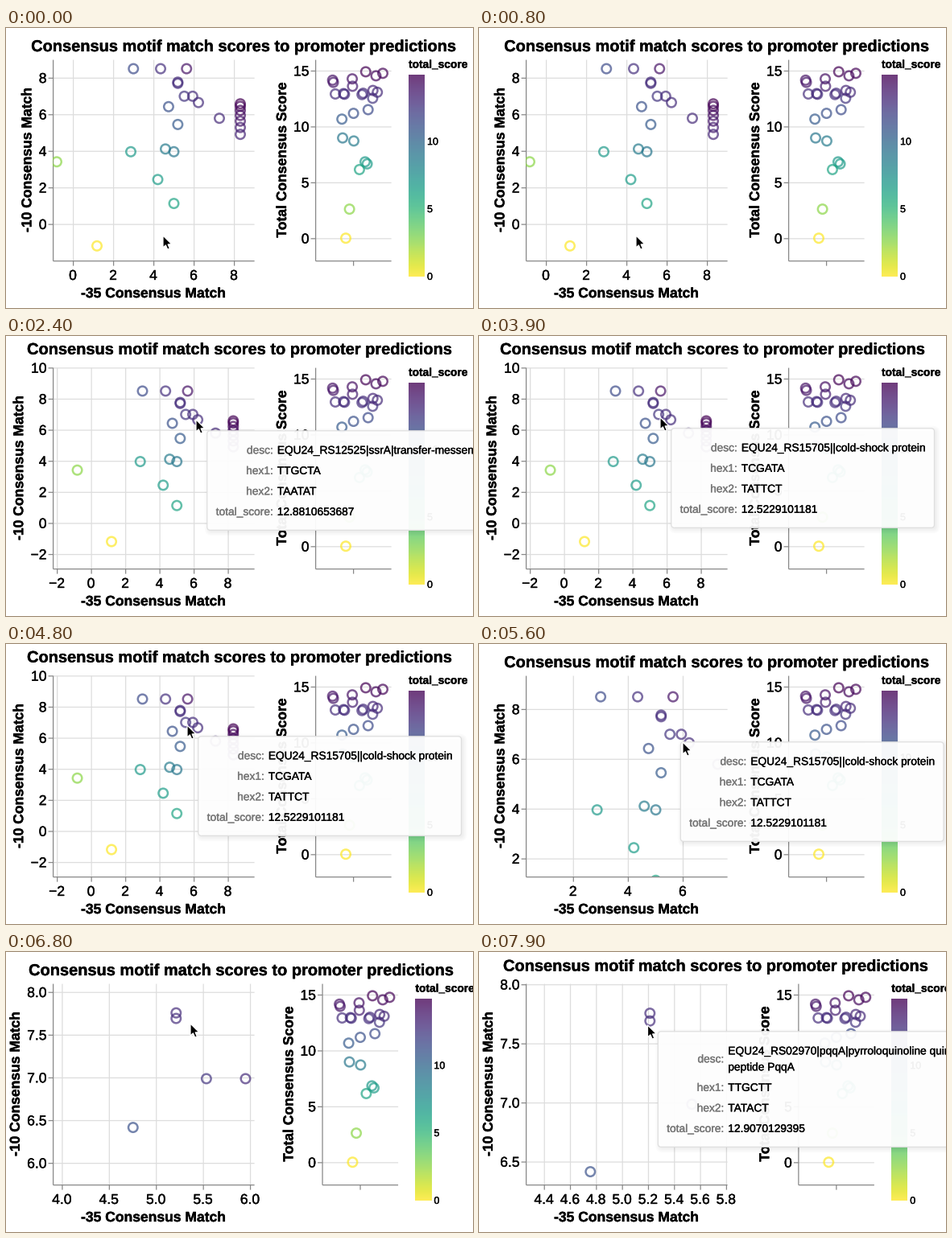
Recreate the animation shown at these times as a matplotlib script. Size 580 by 348 pixels, loop 8000 ms.

```python
import math

import matplotlib.pyplot as plt
import numpy as np
from matplotlib.animation import FuncAnimation
from matplotlib.patches import FancyBboxPatch, Polygon, Rectangle
from matplotlib.patheffects import withStroke

W, H, DPI = 580, 348, 100
PT = 72 / DPI  # points per pixel
STEP = 100     # ms per frame
plt.rcParams["font.family"] = "Liberation Sans"
plt.rcParams["text.hinting"] = "none"

LEFT, RIGHT, TOP, BOTTOM = 58, 308, 39, 289
AXIS, GRID = "#888888", "#dddddd"
MAX_SCORE = 14.9
VIRIDIS = plt.get_cmap("viridis")

# -35 and -10 match; the best -35 matches share one column
SPREAD = [
    (3.01, 8.49), (4.36, 8.49), (5.65, 8.49), (5.215, 7.755), (5.215, 7.69),
    (5.537, 6.985), (5.953, 6.985), (6.24, 6.64), (4.757, 6.414),
    (5.215, 5.44), (4.6, 4.1), (5.02, 3.95), (2.88, 3.95), (4.22, 2.43),
    (5.02, 1.12), (-0.8, 3.4), (1.2, -1.2), (7.28, 5.78),
]
COLUMN = [(8.32, 6.57 - 1.67 * (k / 6) ** 1.4) for k in range(7)]
POINTS = np.array(SPREAD + COLUMN)
SCORES = POINTS.sum(axis=1)
COLORS = VIRIDIS(1 - np.clip(SCORES / MAX_SCORE, 0, 1))

# Sideways jitter swings wider with the rank of the score
RANK = SCORES.argsort().argsort()
JITTER = 50 - (12 + RANK) * np.cos(2 * np.pi * RANK / 6.5)

# start, end, factor, fixed point
ZOOMS = [
    (1200, 2200, 1 / 1.177, (233, 169)),
    (4900, 5500, 1.603, (200, 73)),
    (5600, 6700, 3.431, (232.3, 93.6)),
    (6800, 7300, 1.383, (208.6, 74.5)),
]

# arrival time and place of the pointer tip
SPEED = 0.25  # px per ms
STOPS = [
    (0, (195, 258)), (1200, (230, 169)), (2400, (236, 104)),
    (3200, (225, 101)), (5500, (236.5, 108)), (5600, (253, 122)),
    (5900, (229, 89)), (7000, (208.5, 85)), (7900, (209.5, 91)),
]

# first and last time shown, then the four fields
KEYS = ("desc", "hex1", "hex2", "total_score")
TIPS = [
    (2300, 3100, "EQU24_RS12525|ssrA|transfer-messenger RNA",
     "TTGCTA", "TAATAT", "12.8810653687"),
    (3200, 5600, "EQU24_RS15705||cold-shock protein",
     "TCGATA", "TATTCT", "12.5229101181"),
    (7300, 7900, "EQU24_RS02970|pqqA|pyrroloquinoline quinone precursor\n"
     "peptide PqqA", "TTGCTT", "TATACT", "12.9070129395"),
]

fig = plt.figure(figsize=(W / DPI, H / DPI), dpi=DPI, facecolor="white")
ax = fig.add_axes([0, 0, 1, 1])


def line(x0, y0, x1, y1, color=AXIS):
    ax.plot([x0 + 0.6, x1 + 0.6], [y0 + 0.6, y1 + 0.6], color=color,
            lw=1.25 * PT, solid_capstyle="butt", snap=False,
            zorder=1 if color == GRID else 2)


def text(x, y, s, size, ha="left", bold=False, color="black", z=4, rot=0):
    ax.text(x, y, s, fontsize=size * PT, ha=ha, va="baseline", color=color,
            weight="bold" if bold else "normal", rotation=rot,
            rotation_mode="anchor", zorder=z,
            path_effects=[withStroke(linewidth=0.35 * PT, foreground=color)])


def circles(x, y):
    return ax.scatter(x, y, s=(11.5 * PT) ** 2, facecolors="none",
                      edgecolors=COLORS, linewidths=2.5 * PT, alpha=0.7,
                      zorder=3)


def zoom(t):
    """Scale and offset of the plot after all zooming up to time t."""
    scale, offset = 1, np.zeros(2)
    for start, end, factor, fixed in ZOOMS:
        f = np.clip((t - start) / (end - start), 0, 1)
        k = factor ** (1 - (1 - f) ** 2)
        scale *= k
        offset = fixed + (offset - fixed) * k
    return scale, offset


def pointer(t):
    """Rest at each stop, then leave just in time for the next one."""
    pos = np.array(STOPS[0][1], float)
    for arrive, stop in STOPS[1:]:
        way = np.subtract(stop, pos)
        left = max(arrive - t, 0) * SPEED / np.hypot(*way)
        pos = pos + way * (1 - min(left, 1))
        if left > 0:
            break
    return pos


def ticks(lo, hi):
    """Nice tick values and their labels, about five per axis."""
    raw = (hi - lo) / 5
    base = 10 ** math.floor(math.log10(raw))
    step = base * next(m for m in (10, 5, 2, 1)
                       if m == 1 or raw / base >= math.sqrt(m * {
                           10: 5, 5: 2, 2: 1}[m]))
    digits = 0 if step >= 1 else 1
    values = [k * step for k in range(math.ceil(lo / step),
                                      math.floor(hi / step) + 1)]
    return [(v, f"{v:.{digits}f}".replace("-", "\u2212")) for v in values]


def label_width(s):
    units = {".": 0.278, "\u2212": 0.584}
    return 17.5 * sum(units.get(c, 0.556) for c in s)


def draw_scatter(t):
    """Draw the zoomable plot; return the layout shifts it causes."""
    scale, (ox, oy) = zoom(t)
    ux, uy = 25 * scale, 250 / 11 * scale
    x0 = scale * (LEFT + 25) + ox
    y0 = scale * (BOTTOM - 500 / 11) + oy

    right = up = widest = 0
    for v, s in ticks((LEFT - x0) / ux, (RIGHT - x0) / ux):
        x = x0 + v * ux
        line(x, TOP, x, BOTTOM, GRID)
        line(x, BOTTOM, x, BOTTOM + 6)
        text(x, 313, s, 17.5, "center")
        over = x + label_width(s) / 2 - RIGHT
        if over > 0:
            right = over + 1.3
    for v, s in ticks((y0 - BOTTOM) / uy, (y0 - TOP) / uy):
        y = y0 - v * uy
        line(LEFT, y, RIGHT, y, GRID)
        line(LEFT - 6, y, LEFT, y)
        text(50.5, y + 6.4, s, 17.5, "right")
        widest = max(widest, label_width(s))
        up = max(up, TOP - y + 6.5)
    line(LEFT, TOP, LEFT, BOTTOM)
    line(LEFT, BOTTOM, RIGHT, BOTTOM)

    dots = circles(x0 + POINTS[:, 0] * ux, y0 - POINTS[:, 1] * uy)
    dots.set_clip_path(Rectangle((LEFT, TOP), RIGHT - LEFT, BOTTOM - TOP,
                                 transform=ax.transData))
    text(183, 335, "-35 Consensus Match", 17.5, "center", True)
    text(41.2 - widest, 164, "-10 Consensus Match", 17.5, "center", True,
         rot=90)
    return right, up, 20 - widest


def draw_strip(dx):
    x0, x1 = 384 + dx, 478 + dx

    def py(v):
        return BOTTOM - (v + 2) / 18 * (BOTTOM - TOP)

    for v in range(0, 16, 5):
        y = py(v)
        line(x0, y, x1, y, GRID)
        line(x0 - 6, y, x0, y)
        text(x0 - 7.5, y + 6.4, str(v), 17.5, "right")
    line(x0, TOP, x0, BOTTOM)
    line(x0, BOTTOM, x1, BOTTOM)
    line(x0 + 47, BOTTOM, x0 + 47, BOTTOM + 6)
    circles(x0 + JITTER, py(SCORES))
    text(348 + dx, 164, "Total Consensus Score", 17.5, "center", True, rot=90)


def draw_legend(dx):
    x = 500 + dx
    ax.imshow(np.linspace(0, 1, 250)[:, None], cmap=VIRIDIS, alpha=0.77,
              extent=(x, x + 20, 309, 58), aspect="auto", zorder=2)
    text(x, 49.5, "total_score", 13.75, bold=True)
    for v in range(0, 11, 5):
        text(x + 23, 308.5 - v / MAX_SCORE * 250 + 4.4, str(v), 12.5)


def rounded(x, y, w, h, r, **style):
    ax.add_patch(FancyBboxPatch((x, y), w, h, mutation_aspect=1,
                                boxstyle=f"round,pad=0,rounding_size={r}",
                                **style))


def draw_tip(t):
    shown = [tip for tip in TIPS if tip[0] <= t <= tip[1]]
    if not shown:
        return
    _, end, *fields = shown[0]
    # The box trails the pointer by a frame when it moves off
    x, y = pointer(min(t, end - STEP)) + 13.8
    w = 99 + 6.9 * len(fields[0])
    h = 123.5 + 20 * fields[0].count("\n")
    for k in range(6):
        g = 5 - 1.6 * k
        rounded(x + 2 - g, y + 2 - g, w + 2 * g, h + 2 * g, max(4 + g, 2),
                fc="black", ec="none", alpha=0.017, zorder=5)
    rounded(x, y, w, h, 4, fc=(1, 1, 1, 0.95), ec="#dedede", lw=1.2 * PT,
            zorder=6)
    base = y + 28.5
    for key, field in zip(KEYS, fields):
        values = field.split("\n")
        extra = 20 * (len(values) - 1)
        text(x + 82, base + extra / 2, key + ":", 13.75, "right",
             color="#777777", z=7)
        for k, value in enumerate(values):
            text(x + 87, base + 20 * k, value, 13.75, z=7)
        base += 25.5 + extra


def draw_pointer(t):
    shape = 1.05 * np.array([(0, 0), (0, 14.2), (3.2, 11.3), (5.4, 16.3),
                             (7.9, 15.2), (5.8, 10.4), (10.2, 10.2)])
    ax.add_patch(Polygon(shape + pointer(t), fc="black", ec="white",
                         lw=1.2 * PT, joinstyle="round", zorder=8))


def draw(i):
    t = i * STEP
    ax.clear()
    ax.axis("off")
    dx, up, dleft = draw_scatter(t)
    draw_strip(dx)
    draw_legend(dx)
    text(290 + (dleft + dx) / 2, 29 - up,
         "Consensus motif match scores to promoter predictions", 20,
         "center", True)
    draw_tip(t)
    draw_pointer(t)
    ax.set_xlim(0, W)
    ax.set_ylim(H, 0)
    return []


anim = FuncAnimation(fig, draw, frames=80, interval=STEP, repeat=True,
                     repeat_delay=0, blit=False)
plt.show()
```
